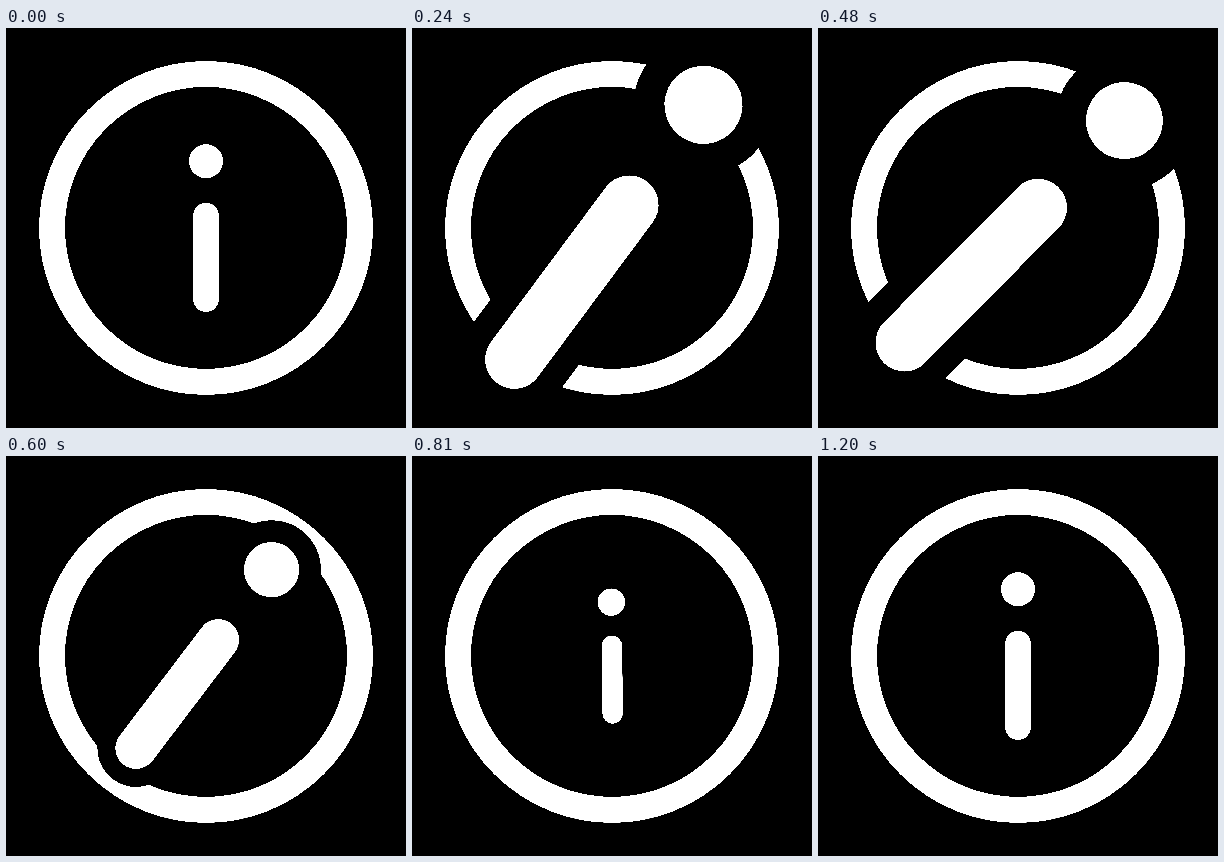
Write an HTML page with a canvas that moves like this. It is 400x400 px and loops after 3230 ms.

```html
<!DOCTYPE html>
<html lang="en">
<head>
<meta charset="utf-8">
<title>Info icon</title>
<style>
  html, body { margin: 0; height: 100%; overflow: hidden; background: #000; }
  /* High contrast keeps the edges hard */
  canvas { display: block; width: 100vw; height: 100vh; filter: contrast(20); }
</style>
</head>
<body>
<canvas id="stage" width="400" height="400"></canvas>
<script>
const ctx = document.getElementById('stage').getContext('2d');
const LOOP = 3230;
const STEP = 30;

// Keys: [time in ms, value, easing handle of the segment that ends here]
const SCALE = [[0, 1], [240, 2.3, 0.42], [470, 2.27, 0.42], [750, 0.8, 0.42], [1200, 1, 0.42]];
const ANGLE = [[0, 0], [335, 44.75, 0.375], [478, 44.75, 0.42], [957, -11.7, 0.42], [1200, 0, 0.42]];

// Symmetric ease-in-out: cubic-bezier(k, 0, 1 - k, 1)
function ease(x, k) {
  let lo = 0, hi = 1;
  for (let i = 0; i < 24; i++) {
    const p = (lo + hi) / 2, q = 1 - p;
    const at = 3 * k * p * q * q + 3 * (1 - k) * p * p * q + p * p * p;
    if (at < x) lo = p; else hi = p;
  }
  return lo * lo * (3 - 2 * lo);
}

function valueAt(keys, t) {
  for (let i = 1; i < keys.length; i++) {
    const [t0, v0] = keys[i - 1];
    const [t1, v1, k] = keys[i];
    if (t < t1) return v0 + (v1 - v0) * ease((t - t0) / (t1 - t0), k);
  }
  return keys[keys.length - 1][1];
}

function dot(r, color) {
  ctx.fillStyle = color;
  ctx.beginPath();
  ctx.arc(0, -66.7, r, 0, Math.PI * 2);
  ctx.fill();
}

function stem(r, color) {
  ctx.strokeStyle = color;
  ctx.lineWidth = r * 2;
  ctx.lineCap = 'round';
  ctx.beginPath();
  ctx.moveTo(0, -12.6);
  ctx.lineTo(0, 71.2);
  ctx.stroke();
}

function draw(t) {
  ctx.setTransform(1, 0, 0, 1, 0, 0);
  ctx.fillStyle = '#000';
  ctx.fillRect(0, 0, 400, 400);

  ctx.translate(200, 200);
  ctx.strokeStyle = '#fff';
  ctx.lineWidth = 26;
  ctx.beginPath();
  ctx.arc(0, 0, 154, 0, Math.PI * 2);
  ctx.stroke();

  const s = valueAt(SCALE, t);
  ctx.rotate(valueAt(ANGLE, t) * Math.PI / 180);
  ctx.scale(s, s);
  // Black outlines cut the ring
  dot(30.4, '#000');
  stem(23.85, '#000');
  dot(17, '#fff');
  stem(12.75, '#fff');
}

const start = performance.now();
function tick() {
  const t = (performance.now() - start) % LOOP;
  draw(Math.floor(t / STEP) * STEP);
  requestAnimationFrame(tick);
}
tick();
</script>
</body>
</html>
```
